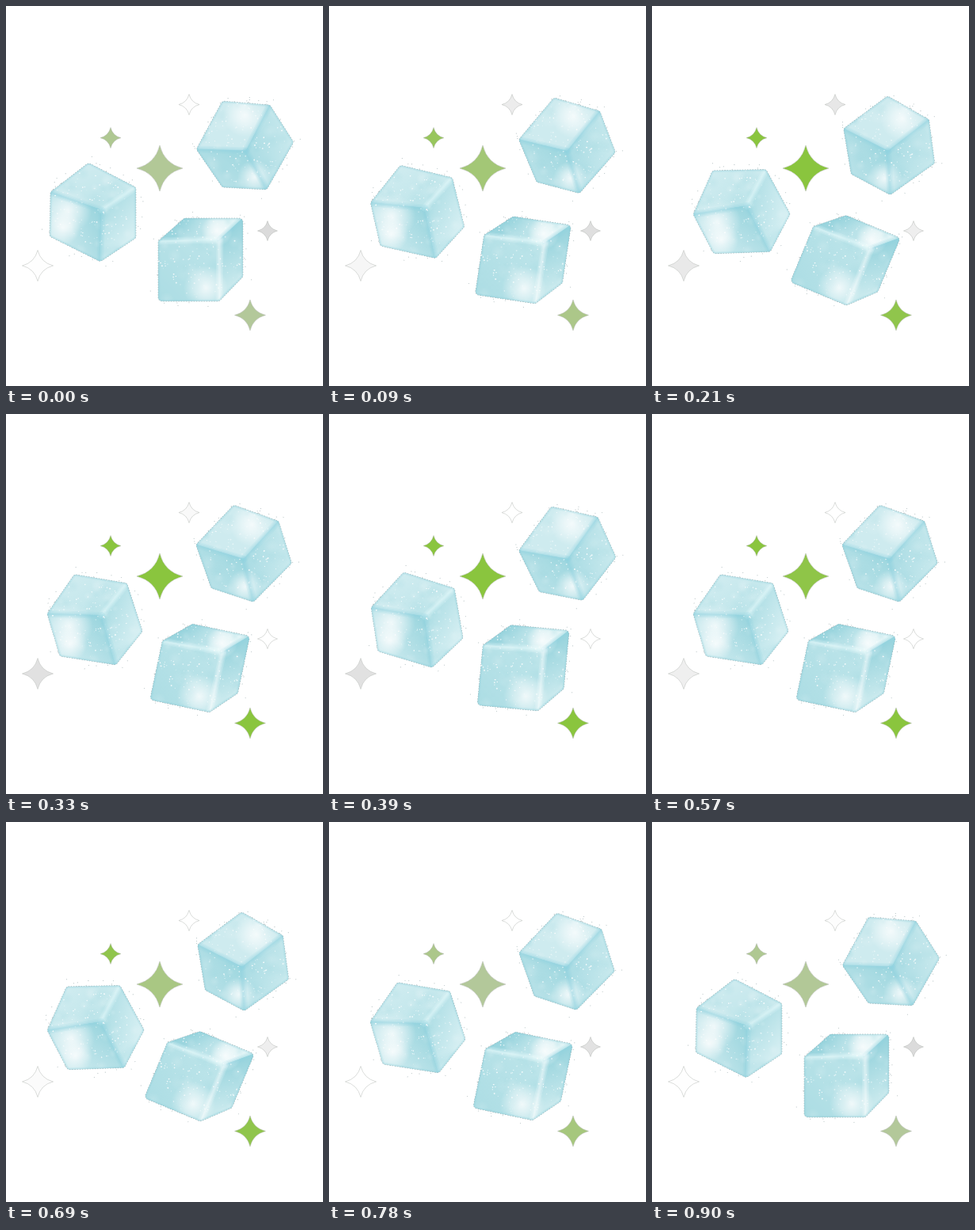
Animation of 400x480 px, one loop 0.93 s. Source, as an HTML page with a canvas:

```html
<!DOCTYPE html>
<html lang="en">
<head>
<meta charset="utf-8">
<title>Ice cubes</title>
<style>
html, body { margin: 0; width: 100%; height: 100%; overflow: hidden; background: #fff; }
canvas { display: block; }
</style>
</head>
<body>
<canvas id="stage" width="400" height="480"></canvas>
<script>
const ctx = document.getElementById('stage').getContext('2d');
const LOOP = 930, STEP = 30, CYCLE = 900, SWING = CYCLE / 2;
const WHITE = [255, 255, 255], PALE = [240, 250, 251], TEAL = [140, 207, 217];

// The hull runs clockwise; the inner corner joins hull points 0, 2 and 4.
// Shades give the depth of teal at the inner and far corners of top, front and side.
const cubes = [
  {
    pivot: [109.5, 257.2], swing: -30.2, power: 0.85, seed: 11,
    hull: [[56, 235], [104, 198], [164, 229], [164, 293], [119, 323], [55, 291]], inner: [121, 258],
    shades: [[0.5, 0.32], [0.88, 0.32], [0.68, 0.22]],
    glows: [[78, 258, 30], [72, 280, 22]], edges: [TEAL, PALE, TEAL]
  },
  {
    pivot: [299.7, 171.5], swing: 26.6, power: 0.9, seed: 29,
    hull: [[240, 181], [273, 120], [333, 125], [363, 172], [329, 232], [273, 229]], inner: [303, 183],
    shades: [[0.34, 0.34], [0.82, 0.55], [0.72, 0.38]],
    glows: [[302, 138, 28], [314, 216, 22]], edges: [TEAL, TEAL, TEAL]
  },
  {
    pivot: [244, 316.5], swing: 24.5, power: 1.15, seed: 47,
    hull: [[192, 297], [225, 268], [299, 268], [299, 342], [269, 373], [192, 373]], inner: [270, 295],
    shades: [[0.15, 0.85], [0.5, 0.68], [0.85, 0.4]],
    glows: [[266, 284, 20], [252, 356, 28]], edges: [PALE, TEAL, WHITE]
  }
];

// Each star's brightness is a clamped cosine around its peak time.
const GREEN = [[179, 200, 154], [138, 197, 62]];
const GREY = [WHITE, [219, 219, 219]];
const stars = [
  { x: 194, y: 205, r: 29, tones: GREEN, peak: 375, base: 0.72, gain: 0.8 },
  { x: 132, y: 166.5, r: 13, tones: GREEN, peak: 400, base: 1.5, gain: 1.5 },
  { x: 308, y: 390.5, r: 19.5, tones: GREEN, peak: 450, base: 0.95, gain: 0.95 },
  { x: 231, y: 124.5, r: 13, tones: GREY, peak: 175, base: -0.3, gain: 1 },
  { x: 330, y: 284, r: 12.5, tones: GREY, peak: 0, base: 0.4, gain: 0.6 },
  { x: 40, y: 328, r: 19.5, tones: GREY, peak: 360, base: 0.4, gain: 0.45 }
];

const mix = (a, b, k) => a + (b - a) * k;
const mixAll = (p, q, k) => p.map((v, i) => mix(v, q[i], k));
const clamp = v => Math.max(0, Math.min(1, v));
const rgba = (rgb, alpha = 1) => `rgba(${rgb.map(Math.round)},${alpha})`;

function randomFrom(seed) {
  return () => {
    seed = (seed * 16807) % 2147483647;
    return seed / 2147483647;
  };
}

function polygon(c, points, radius = 0) {
  c.beginPath();
  c.moveTo(...mixAll(points.at(-1), points[0], 0.5));
  points.forEach((p, i) => c.arcTo(...p, ...points[(i + 1) % points.length], radius));
  c.closePath();
}

function glow(c, x, y, r, rgb, alpha) {
  const g = c.createRadialGradient(x, y, 0, x, y, r);
  g.addColorStop(0, rgba(rgb, alpha));
  g.addColorStop(0.45, rgba(rgb, alpha * 0.6));
  g.addColorStop(1, rgba(rgb, 0));
  c.fillStyle = g;
  c.fillRect(x - r, y - r, r * 2, r * 2);
}

function softLine(c, p, q, rgb, alpha, widths) {
  c.strokeStyle = rgba(rgb, alpha);
  for (const w of widths) {
    c.lineWidth = w;
    c.beginPath();
    c.moveTo(...p);
    c.lineTo(...q);
    c.stroke();
  }
}

function paintFaces(c, { hull, inner, shades }) {
  [0, 4, 2].forEach((first, i) => {
    const [a, far, b] = [0, 1, 2].map(k => hull[(first + k) % 6]);
    const fill = c.createLinearGradient(...inner, ...far);
    shades[i].forEach((depth, stop) => fill.addColorStop(stop, rgba(mixAll(PALE, TEAL, depth))));
    polygon(c, [inner, a, far, b]);
    c.fillStyle = c.strokeStyle = fill;
    c.lineWidth = 1;
    c.fill();
    c.stroke();
  });
}

function paintSpecks(c, [px, py], random) {
  for (let i = 0; i < 120; i++) {
    const angle = random() * Math.PI * 2, reach = Math.sqrt(random()) * 52;
    c.fillStyle = rgba(WHITE, 0.3 + random() * 0.6);
    c.beginPath();
    c.arc(px + Math.cos(angle) * reach, py + Math.sin(angle) * reach, 0.4 + random() * 0.6, 0, 7);
    c.fill();
  }
}

function paintDust(c, { hull, pivot }, random) {
  c.fillStyle = 'rgba(165,180,182,.65)';
  for (let i = 0; i < 30; i++) {
    const side = Math.floor(random() * 3) + (i % 4 ? 0 : 3);
    const p = mixAll(hull[side], hull[(side + 1) % 6], random());
    c.fillRect(...mixAll(pivot, p, 1.02 + random() ** 2 * 0.18), 1.1, 1.1);
  }
}

function paintCube(cube) {
  const scale = 2, half = 80;
  const canvas = document.createElement('canvas');
  canvas.width = canvas.height = half * 2 * scale;
  const c = canvas.getContext('2d');
  const { hull, inner, pivot } = cube;
  const random = randomFrom(cube.seed * 7919);
  c.scale(scale, scale);
  c.translate(half - pivot[0], half - pivot[1]);

  paintDust(c, cube, random);
  c.save();
  polygon(c, hull, 5);
  c.clip();
  paintFaces(c, cube);
  for (let i = 0; i < 40; i++) {
    const [x, y] = pivot.map(v => v + (random() - 0.5) * 116);
    glow(c, x, y, 4 + random() * 9, i % 2 ? WHITE : TEAL, 0.14);
  }
  for (const [x, y, r] of cube.glows) glow(c, x, y, r, WHITE, 0.8);
  c.lineCap = 'round';
  cube.edges.forEach((rgb, i) => softLine(c, inner, hull[i * 2], rgb, 0.15, [9, 6, 3.5, 1.8]));
  hull.forEach((p, i) => softLine(c, p, hull[(i + 1) % 6], TEAL, 0.16, [5, 2.5]));
  paintSpecks(c, pivot, random);
  c.restore();

  polygon(c, hull, 5);
  c.lineWidth = 0.9;
  c.setLineDash([1.4, 1.8]);
  c.strokeStyle = 'rgba(160,182,186,.75)';
  c.stroke();
  return { canvas, half };
}

function drawCube({ pivot, swing, power, sprite }, t) {
  const phase = (t % SWING) / SWING;
  const lift = (1 - Math.abs(1 - 2 * phase)) ** power;
  const { canvas, half } = sprite;
  ctx.save();
  ctx.translate(...pivot);
  ctx.rotate(swing * lift * Math.PI / 180);
  ctx.drawImage(canvas, -half, -half, half * 2, half * 2);
  ctx.restore();
}

function drawStar({ x, y, r, tones, peak, base, gain }, t) {
  const level = clamp(base + gain * Math.cos((t - peak) / CYCLE * Math.PI * 2));
  const waist = r * 0.2;
  ctx.beginPath();
  ctx.moveTo(x, y - r);
  ctx.quadraticCurveTo(x + waist, y - waist, x + r, y);
  ctx.quadraticCurveTo(x + waist, y + waist, x, y + r);
  ctx.quadraticCurveTo(x - waist, y + waist, x - r, y);
  ctx.quadraticCurveTo(x - waist, y - waist, x, y - r);
  ctx.closePath();
  ctx.fillStyle = rgba(mixAll(...tones, level));
  ctx.fill();
  ctx.lineWidth = 0.6;
  ctx.lineJoin = 'round';
  ctx.strokeStyle = 'rgba(175,180,175,.75)';
  ctx.stroke();
}

function render(now) {
  const t = Math.floor((now % LOOP) / STEP) * STEP;
  ctx.fillStyle = '#fff';
  ctx.fillRect(0, 0, 400, 480);
  stars.forEach(star => drawStar(star, t));
  cubes.forEach(cube => drawCube(cube, t));
}

for (const cube of cubes) cube.sprite = paintCube(cube);

const start = performance.now();
function tick() {
  render(performance.now() - start);
  requestAnimationFrame(tick);
}
tick();
</script>
</body>
</html>
```
